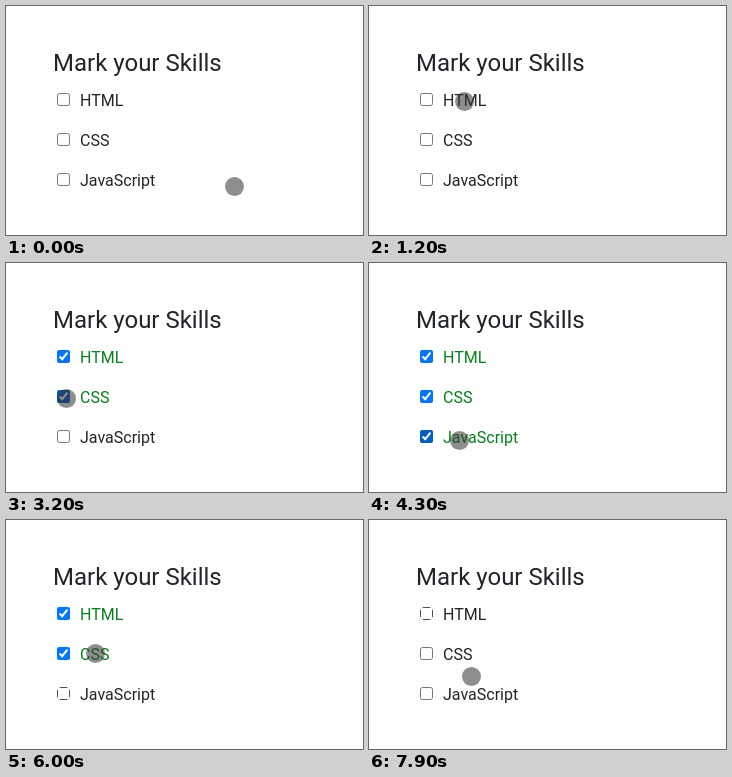
Animation of 357 by 229 pixels, one loop 8 s. Source, as an HTML page:

```html
<!DOCTYPE html>
<html lang="en">
<head>
<meta charset="utf-8">
<title>Mark your Skills</title>
<style>
  html, body { margin: 0; width: 100%; height: 100%; overflow: hidden; background: #fff; }
  body { position: relative; font: 16px/19px Roboto, sans-serif; color: #212529; }
  h1, label, input, #touch { position: absolute; margin: 0; white-space: nowrap; }
  h1 { left: 47px; top: 43px; font: 24px/28px Roboto, sans-serif; }
  label { left: 51px; padding-left: 23px; pointer-events: none; }
  input { left: 0; top: 2px; width: 13px; height: 13px; }
  .on { color: #07811b; }
  .hover input { accent-color: #005cc8; }
  .hover input:not(:checked) { filter: contrast(5); }
  #touch { width: 19px; height: 19px; border-radius: 50%; background: rgba(50, 50, 50, .55); }
</style>
</head>
<body>
<h1>Mark your Skills</h1>
<label style="top: 85px"><input type="checkbox" autocomplete="off">HTML</label>
<label style="top: 125px"><input type="checkbox" autocomplete="off">CSS</label>
<label style="top: 165px"><input type="checkbox" autocomplete="off">JavaScript</label>
<div id="touch"></div>
<script>
  const LOOP = 8000, STEP = 100, RADIUS = 9.5;
  const HTML = 0, CSS = 1, JS = 2;

  // Each move: start time, number of steps, end point.
  const moves = [
    [500, 3, 133.5, 140.5],
    [900, 4, 95.5, 95.5],
    [2200, 3, 83.5, 125.5],
    [2600, 4, 60.5, 135.5],
    [3300, 5, 90.5, 177.5],
    [4400, 4, 47.5, 173.5],
    [5300, 1, 52.5, 176.5],
    [5800, 3, 89.5, 133.5],
    [6300, 1, 79.5, 132.5],
    [6800, 2, 75.5, 124.5],
    [7000, 2, 57.5, 100.5],
    [7300, 1, 53.5, 94.5],
    [7700, 1, 69.5, 124.5],
    [7900, 1, 102.5, 156.5]
  ];

  // Hover stays on the last tapped row.
  const taps = [[2000, HTML], [3200, CSS], [4300, JS], [5700, JS], [6700, CSS], [7600, HTML]];

  const labels = document.querySelectorAll('label');
  const touch = document.getElementById('touch');
  const ease = p => p * p * (3 - 2 * p);

  function position(t) {
    let x = 228.5, y = 180.5;
    for (const [start, steps, endX, endY] of moves) {
      if (t < start) break;
      const step = Math.floor((t - start) / STEP) + 1;
      const k = ease(Math.min(step / steps, 1));
      x += (endX - x) * k;
      y += (endY - y) * k;
    }
    return [x, y];
  }

  function draw() {
    const t = performance.now() % LOOP;
    const [x, y] = position(t);
    touch.style.left = x - RADIUS + 'px';
    touch.style.top = y - RADIUS + 'px';

    const done = taps.filter(([time]) => time <= t).map(([, row]) => row);
    labels.forEach((label, row) => {
      const on = done.filter(r => r === row).length % 2 === 1;
      label.firstChild.checked = on;
      label.classList.toggle('on', on);
      label.classList.toggle('hover', done[done.length - 1] === row);
    });
    requestAnimationFrame(draw);
  }
  draw();
</script>
</body>
</html>
```
